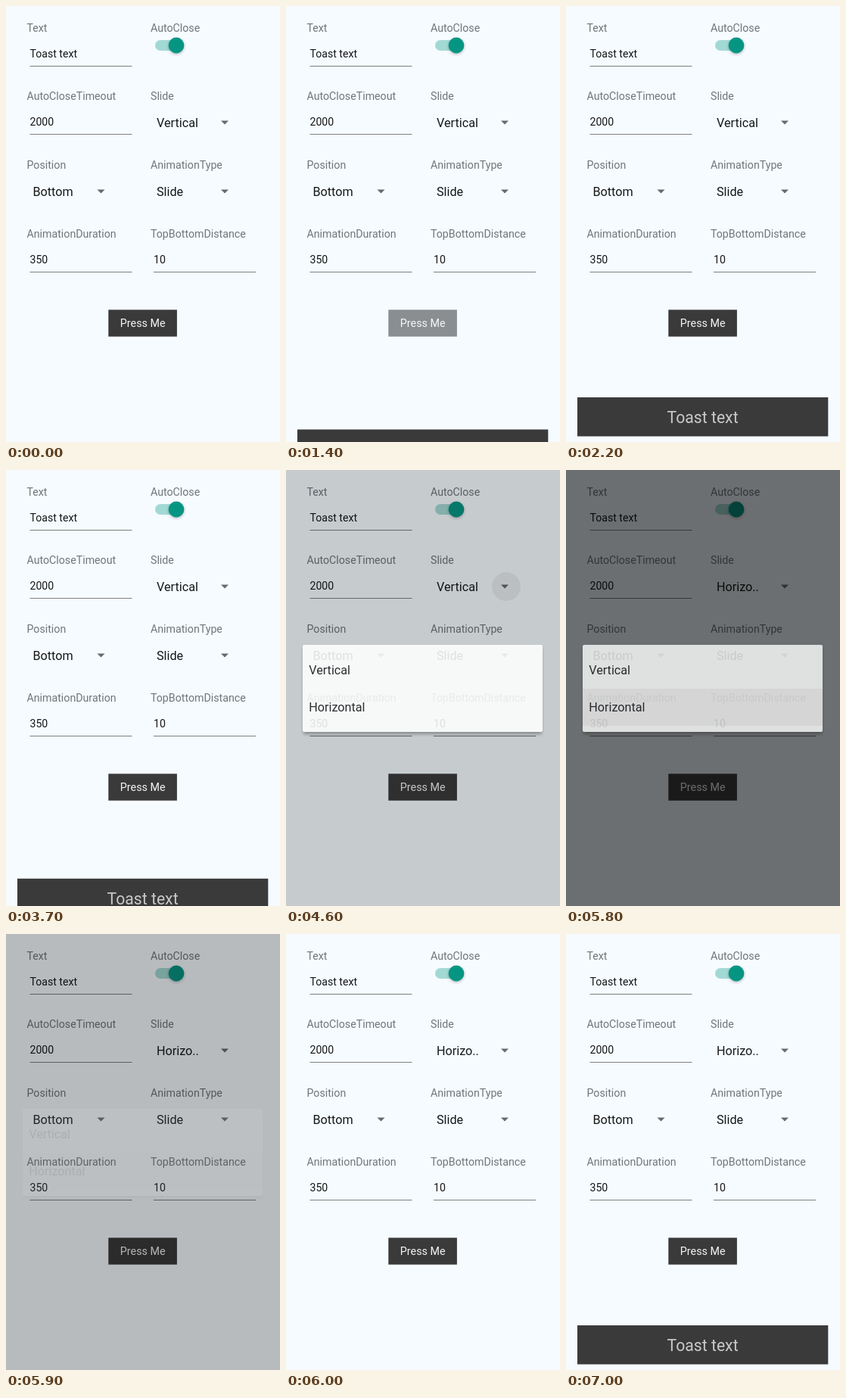
An HTML page for the animation above (8 s loop, 362 by 576 pixels).

```html
<!DOCTYPE html>
<html lang="en">
<head>
<meta charset="utf-8">
<title>Toast settings</title>
<style>
  html, body { margin: 0; width: 100%; height: 100%; overflow: hidden; background: #f5fbff; }
  svg { display: block; font-family: Roboto, sans-serif; }
  .label { font-size: 14.2px; fill: #717578; }
  .input { font-size: 14.1px; fill: #161819; }
  .pick { font-size: 16.2px; fill: #161819; }
  .button { font-size: 14.3px; fill: #f4f4f4; }
  .toast { font-size: 21.2px; fill: #c9c9c9; }
  .dark { fill: #3a3a3a; }
</style>
</head>
<body>
<svg width="362" height="576" viewBox="0 0 362 576">
  <defs>
    <filter id="soft" x="-30%" y="-30%" width="160%" height="160%">
      <feGaussianBlur stdDeviation="2"/>
    </filter>
  </defs>
  <g id="form"></g>
  <rect x="197" y="45" width="34" height="14" rx="7" fill="#a3d9d4"/>
  <circle cx="225" cy="53.5" r="10" opacity=".3" filter="url(#soft)"/>
  <circle cx="225" cy="52" r="10.4" fill="#079583"/>
  <circle id="ripple" cx="291" cy="154" r="19"/>
  <g id="press">
    <rect class="dark" x="135.3" y="401.3" width="90.6" height="35.4"/>
    <text class="button" x="180.7" y="424.4" text-anchor="middle">Press Me</text>
  </g>
  <g id="toast">
    <rect class="dark" x="15" y="517" width="331.3" height="51.5"/>
    <text class="toast" x="180.6" y="551" text-anchor="middle">Toast text</text>
  </g>
  <rect id="dim" width="362" height="576"/>
  <g id="menu">
    <rect x="23" y="235" width="315" height="114" opacity=".35" filter="url(#soft)"/>
    <rect x="22" y="231" width="317" height="115" rx="2" fill="#fff"/>
    <rect id="chosen" x="22" y="289" width="317" height="49"/>
    <text class="pick" x="30.2" y="270">Vertical</text>
    <text class="pick" x="30.2" y="319">Horizontal</text>
  </g>
</svg>
<script>
const LOOP = 8000, STEP = 100;
const $ = id => document.getElementById(id);

const text = (kind, x, y, str) => `<text class="${kind}" x="${x}" y="${y}">${str}</text>`;
const label = (x, y, str) => text("label", x, y, str);
const input = (x, y, name, value) => label(x, y, name) +
  text("input", x + 4, y + 34, value) +
  `<rect x="${x + 4}" y="${y + 45}" width="135" height="1" fill="#7c8082"/>`;
const picker = (x, y, name, value) => label(x, y, name) +
  text("pick", x + 8, y + 36, value) +
  `<path d="M${x + 93} ${y + 27.5}h10l-5 5z" fill="#676b6e"/>`;

const L = 27.5, R = 191;
const form = slide =>
  input(L, 34, "Text", "Toast text") +
  label(R, 34, "AutoClose") +
  input(L, 124, "AutoCloseTimeout", "2000") +
  picker(R, 124, "Slide", slide) +
  picker(L, 215, "Position", "Bottom") +
  picker(R, 215, "AnimationType", "Slide") +
  input(L, 306, "AnimationDuration", "350") +
  input(R, 306, "TopBottomDistance", "10");

// Progress from 0 to 1, linear or eased in and out
const ramp = (t, start, span) => Math.min(1, Math.max(0, (t - start) / span));
const ease = (t, start) => {
  const p = ramp(t, start, 350);
  return p < .5 ? 4 * p ** 3 : 1 - 4 * (1 - p) ** 3;
};

function draw(now) {
  const t = Math.floor(now % LOOP / STEP) * STEP;
  const fade = (id, value) => $(id).setAttribute("opacity", value);
  const late = t >= 5000;
  const tap = late ? 6600 : 1300;

  $("form").innerHTML = form(t < 5800 ? "Vertical" : "Horizo..");
  fade("press", 1 - .55 * (ramp(t, tap - 100, 100) - ramp(t, tap + 50, 250)));
  fade("ripple", .06 * (ramp(t, 4500, 100) - ramp(t, 4600, 200)));
  fade("dim", .6 * (ramp(t, 4530, 220) - ramp(t, 5785, 200)));
  fade("menu", ramp(t, 4513, 100) - ramp(t, 5770, 140));
  fade("chosen", .05 * ramp(t, 5700, 100));

  const x = late ? 350 * (1 - ease(t, 6650)) : 0;
  const y = late ? 0 : 62 * (1 - ease(t, 1250) + ease(t, 3542));
  $("toast").setAttribute("transform", `translate(${x} ${y})`);
  requestAnimationFrame(draw);
}
requestAnimationFrame(draw);
</script>
</body>
</html>
```
